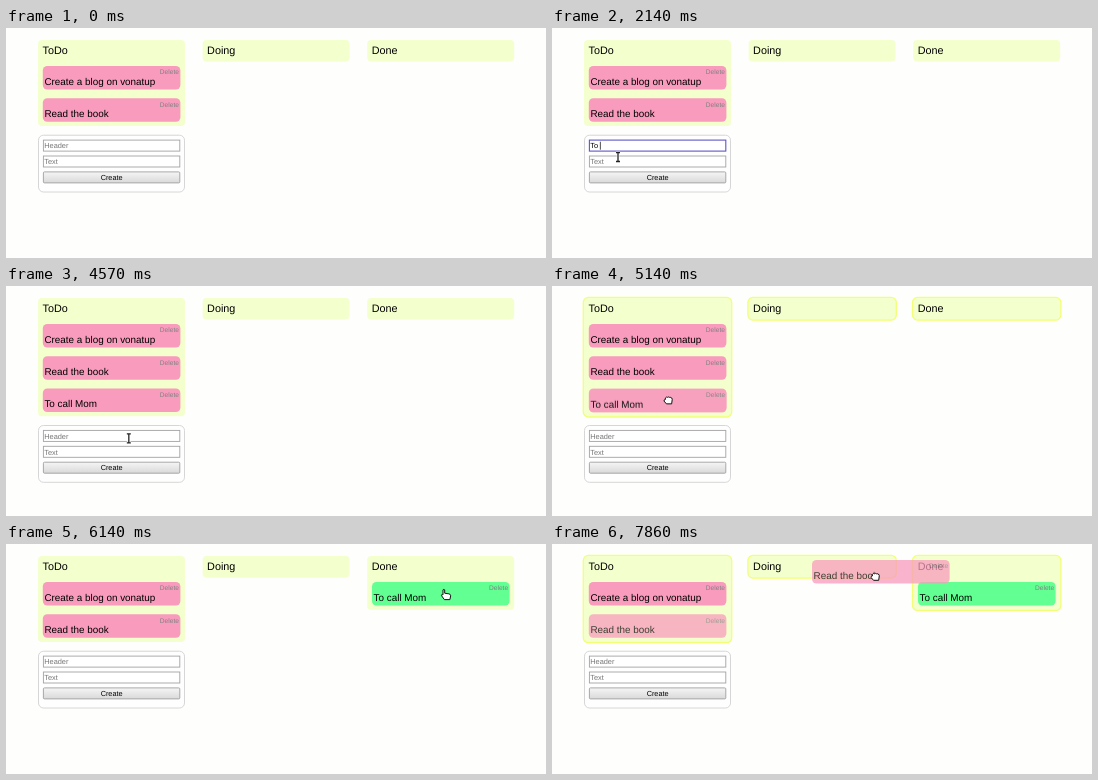
Animation of 540x230 px, one loop 8 s. Source, as an HTML page:

```html
<!DOCTYPE html>
<html lang="en">
<head>
<meta charset="utf-8">
<title>Task board</title>
<style>
  html, body { margin: 0; width: 100%; height: 100%; overflow: hidden; background: #fefefd; }
  svg { display: block; width: 540px; height: 230px; }
  text { font-family: "Liberation Sans", Arial, sans-serif; text-rendering: geometricPrecision; white-space: pre; }
</style>
</head>
<body>
<svg id="stage" viewBox="0 0 540 230">
  <defs>
    <linearGradient id="buttonFill" x2="0" y2="1">
      <stop stop-color="#f5f5f5"/><stop offset="1" stop-color="#d9d9d9"/>
    </linearGradient>
  </defs>
  <g id="scene"></g>
</svg>
<script>
const LOOP = 8000, TICK = 1000 / 7;
const CREATED = 4570, DROPPED = 6000;
const PINK = '#f99bbd', GREEN = '#62ff92';
const CARD_W = 137.6, CARD_H = 23.6, PITCH = 32.3, CARD_TOP = 37.9;
const TASK = 'To call Mom';

// Pointer path: time, x, y
const path = [
  [430, 74, 92], [800, 66, 117], [1140, 66, 117], [1420, 66, 129],
  [3500, 66, 129], [4140, 123, 151], [4570, 123, 153], [4850, 112, 115],
  [5140, 112, 115], [5428, 306, 94], [5571, 340, 65], [5850, 440, 50],
  [6140, 440, 50], [6700, 101, 90], [7000, 101, 90], [7700, 323, 33]
];
const shapes = [
  [430, 'beam'], [3850, 'arrow'], [4570, 'beam'], [4710, 'hand'], [5140, 'fist'],
  [6000, 'hand'], [6280, 'arrow'], [6700, 'hand'], [7140, 'fist']
];
const drags = [
  { from: 4990, to: DROPPED, row: 2, label: TASK, grip: [75, 12] },
  { from: 7000, to: LOOP, row: 1, label: 'Read the book', grip: [63, 17] }
];

const columnX = i => 32 + 164.6 * i;
const cardY = row => CARD_TOP + PITCH * row;

function pointerAt(t) {
  const next = path.findIndex(p => p[0] > t);
  if (next < 0) return path.at(-1).slice(1);
  if (next === 0) return path[0].slice(1);
  const [t0, x0, y0] = path[next - 1], [t1, x1, y1] = path[next];
  let k = (t - t0) / (t1 - t0);
  if (t1 - t0 > 300) k = k * k * (3 - 2 * k);
  return [x0 + (x1 - x0) * k, y0 + (y1 - y0) * k];
}

function typedAt(t) {
  if (t < 1560) return '';
  const count = t < 2280 ? 1 + (t - 1560) / 240 : 4 + (t - 2280) / 118;
  return TASK.slice(0, Math.floor(count));
}

const text = (x, y, size, label, fill = '#000', anchor = 'start') =>
  `<text x="${x}" y="${y}" font-size="${size}" fill="${fill}" text-anchor="${anchor}">${label}</text>`;

const box = (x, y, w, h, r, fill, stroke = 'none', width = 1) =>
  `<rect x="${x}" y="${y}" width="${w}" height="${h}" rx="${r}" fill="${fill}" stroke="${stroke}" stroke-width="${width}"/>`;

function card(x, y, label, fill = PINK, faded = false) {
  return `<g opacity="${faded ? .75 : 1}">` + box(x, y, CARD_W, CARD_H, 4.5, fill) +
    text(x + CARD_W - 1.5, y + 8.3, 6.6, 'Delete', '#808080', 'end') +
    text(x + 1.6, y + 18.6, 9.9, label) + '</g>';
}

function column(i, title, cards, glow, fill, fadedRow) {
  const x = columnX(i), height = 21.4 + PITCH * cards.length;
  return (glow ? box(x - .7, 11.4, 148.4, height + 1.3, 5, '#f4ffce', '#f2ff76', 1.3)
               : box(x, 12, 147, height, 4, '#f4ffce')) +
    text(x + 4.5, 26.4, 10.8, title) +
    cards.map((label, row) => card(x + 4.8, cardY(row), label, fill, row === fadedRow)).join('');
}

function field(y, placeholder, value, focused) {
  return box(37.4, y, 136.4, 11, 0, '#fff', focused ? '#5f57c4' : '#a3a3a3', focused ? 1.1 : .9) +
    text(38.2, y + 8.2, 7.4, value || placeholder, value ? '#000' : '#777');
}

function form(y, t) {
  const focused = t > 1140 && t < CREATED;
  const value = focused ? typedAt(t) : '';
  let out = box(32.5, y, 146, 56.8, 5, '#fefefe', '#d2d2d2', .9) +
    field(y + 4.9, 'Header', value, focused) +
    field(y + 20.8, 'Text', '', false) +
    box(37.4, y + 36.7, 136.4, 11, 1, 'url(#buttonFill)', '#a0a0a0', .9) +
    text(105.6, y + 44.9, 7.3, 'Create', '#000', 'middle');
  if (focused) {
    const probe = document.createElementNS('http://www.w3.org/2000/svg', 'text');
    probe.setAttribute('font-size', 7.4);
    probe.textContent = value;
    stage.append(probe);
    const x = 38.5 + probe.getComputedTextLength();
    probe.remove();
    out += `<path d="M${x} ${y + 6.5}v8" stroke="#000" stroke-width=".7"/>`;
  }
  return out;
}

const cursors = {
  beam: '<path d="M-2-4.5h4M-2 4.5h4M0-4.5v9" fill="none" stroke="#fff" stroke-width="2.6"/>' +
        '<path d="M-2-4.5h4M-2 4.5h4M0-4.5v9" fill="none" stroke="#222" stroke-width="1.3"/>',
  arrow: '<path d="M0 0v10l2.4-2.2 1.6 3.6 1.5-.7-1.6-3.4h3.2z" fill="#111" stroke="#fff" stroke-width=".7"/>',
  hand: '<path d="M-2.9-4.2q.9-.9 1.7 0v3.4l4.2.6q1.8.4 1.8 2l-.8 3.8h-5.5l-2.9-4q-.3-1.5 1.5-.8z" fill="#fff" stroke="#111" stroke-width="1"/>',
  fist: '<path d="M-2.6-2.6q1-1.4 2-.6 1-.9 2 0 1-.5 1.6.4 1.3 0 1.3 1.5l-.6 4.6h-5.2l-2.4-2.8q-.3-1.6 1.3-1.5z" fill="#fff" stroke="#111" stroke-width="1"/>'
};

function draw(t) {
  const drag = drags.find(d => t >= d.from && t < d.to);
  const moving = drag && t > drag.from + 100;
  const todo = ['Create a blog on vonatup', 'Read the book'];
  const pending = t >= CREATED && t < DROPPED;
  if (pending) todo.push(TASK);

  let out = column(0, 'ToDo', todo, moving, PINK, drag?.row) +
    column(1, 'Doing', [], moving) +
    column(2, 'Done', t >= DROPPED ? [TASK] : [], moving, GREEN) +
    form(107.2 + (pending ? PITCH : 0), t);

  if (moving) {
    // The dragged copy trails the pointer by one tick.
    const [x, y] = pointerAt(t - TICK);
    out += card(x - drag.grip[0], y - drag.grip[1], drag.label, PINK, true);
  }
  const shape = shapes.findLast(s => t >= s[0]);
  if (shape) out += `<g transform="translate(${pointerAt(t)})">${cursors[shape[1]]}</g>`;
  scene.innerHTML = out;
}

const stage = document.getElementById('stage'), scene = document.getElementById('scene');
const start = performance.now();
let lastTick = -1;
function frame() {
  const elapsed = (performance.now() - start) % LOOP;
  const tick = Math.floor((elapsed + 3) / TICK) % 56;
  if (tick !== lastTick) draw((lastTick = tick) * TICK + 3);
  requestAnimationFrame(frame);
}
frame();
</script>
</body>
</html>
```
